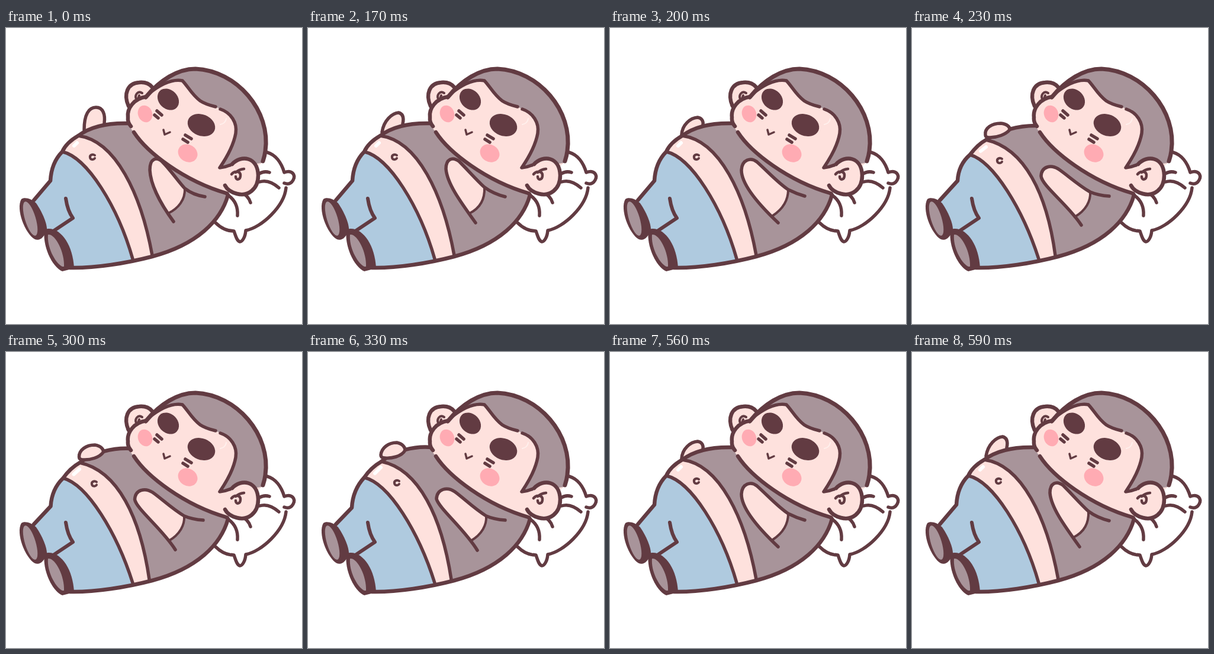
Animation of 500x500 px, one loop 0.62 s. Source, as an HTML page:

```html
<!DOCTYPE html>
<html lang="en">
<head>
<meta charset="utf-8">
<title>Belly pat</title>
<style>
  html, body { margin: 0; width: 100%; height: 100%; overflow: hidden; background: #fff; }
  svg { display: block; width: 100%; height: 100%; }
  .line { fill: none; }
  .skin { fill: #fee1dd; }
  .grey { fill: #a8949a; }
  .blue { fill: #afcadf; }
  .dark { fill: #623b42; }
  .pink { fill: #ffabb3; }
  .skin, .grey, .blue, .dark, .pink { stroke: none; }
</style>
</head>
<body>
<svg viewBox="0 0 500 500" stroke="#623b42" stroke-width="5.500" stroke-linecap="round" stroke-linejoin="round">
  <clipPath id="clip"><path id="clipShape"/></clipPath>

  <g class="line">
    <path d="M441 210C455 214 465 227 470 244C483 239 490 248 485 257C481 264 475 264 470 262"/>
    <path d="M473 270C470 301 432 337 405 342C404 354 399 361 395 361C390 360 388 351 385 343C373 343 362 337 354 329"/>
    <path d="M428 246Q436 241 445 244M428 260C440 256 452 262 461 270M396 277C405 281 411 288 413 295M376 283C387 291 392 303 391 317"/>
  </g>

  <path id="backFill" class="skin"/>
  <path id="backLine" class="line"/>

  <g clip-path="url(#clip)">
    <path class="grey" d="M0 100H400V420H0Z"/>
    <path id="belly" class="skin"/>
    <path id="pants" class="blue"/>
  </g>
  <path id="hem" class="line"/>
  <path id="waist" class="line"/>
  <path id="outline" class="line" stroke-width="6.500"/>
  <path id="shine" class="line" stroke="#fff" stroke-width="6"/>
  <path id="navel" class="line" stroke-width="4" d="M4-3C0-6-5-3-4 1C-3 5 2 5 4 2"/>
  <path class="line" stroke-width="6" d="M101 288Q104 309 113 321L80 343"/>

  <path class="dark" d="M26 289C31 285 43 288 51 296C62 312 70 332 69 342C64 353 58 360 49 357C32 348 16 305 26 289Z"/>
  <ellipse class="grey" cx="41" cy="322" rx="9" ry="30" transform="rotate(-17 41 322)"/>
  <path class="dark" d="M65 340C90 333 113 364 115 406L95 411C77 403 61 367 65 340Z"/>
  <path class="grey" d="M71 349C83 347 99 378 98 403L95 403C82 396 69 369 71 349Z"/>

  <path id="armFill" class="skin"/>
  <path id="armCuff" class="line" stroke-width="4"/>
  <path id="armLine" class="line"/>
  <path id="hand" fill="#fee1dd"/>

  <path class="skin" d="M206 131C198 112 205 93 225 92C235 91 242 94 247 100L236 120Z"/>
  <path class="line" stroke-width="6.500" d="M207 132C198 112 205 93 225 92C235 91 242 94 247 100"/>
  <path class="line" stroke-width="4" d="M220 120C217 113 223 105 230 110M225 114L223 120"/>

  <path class="skin" d="M237 116C216 119 204 136 205 151C204 160 209 168 216 176C238 210 300 258 372 279L432 228C460 140 390 72 320 69C290 69 260 88 237 116Z"/>
  <path class="grey" d="M236 117C260 88 290 69 320 69C390 72 448 140 438 208L432 228L361 237C372 220 384 200 388 178C390 160 380 143 362 137L354 133C340 131 332 127 328 123C315 114 306 97 298 89C280 86 262 94 236 117Z"/>
  <g class="line">
    <path stroke-width="7" d="M236 117C260 88 290 69 320 69C390 72 448 140 438 208Q437 216 434 225"/>
    <path d="M240 112C262 94 282 86 298 89C306 97 315 114 328 123Q337 129 354 133M362 137C380 143 391 160 388 178C384 200 372 220 361 236Q371 235 380 231"/>
    <path stroke-width="6.500" d="M237 116C216 119 204 136 206 151Q205 159 211 166M216 176C238 210 300 258 372 279"/>
    <path stroke="#fff0ed" stroke-width="2" d="M362 163Q371 161 372 153"/>
  </g>

  <path class="skin" d="M382 230C397 214 425 217 426 249C426 273 408 285 390 280Q375 276 370 266Z"/>
  <path class="line" stroke-width="6.500" d="M382 230C397 214 425 217 426 249C426 273 408 285 390 280Q375 276 370 266"/>
  <path class="line" stroke-width="4.500" d="M381 247C386 241 396 241 396 249C396 257 388 258 388 251M388 244Q393 239 402 238"/>

  <ellipse class="dark" cx="274" cy="120.500" rx="20" ry="16" transform="rotate(45 274 120.500)"/>
  <ellipse class="dark" cx="330" cy="164" rx="24" ry="18" transform="rotate(22 330 164)"/>
  <ellipse class="pink" cx="235" cy="145" rx="12" ry="14.500" transform="rotate(-20 235 145)"/>
  <ellipse class="pink" cx="307" cy="211.500" rx="17" ry="14.500" transform="rotate(30 307 211.500)"/>
  <path class="line" d="M255 140L263 147M251 147L257 152M303 181L313 187M299 188L307 193"/>
  <path class="line" stroke-width="3.500" d="M266 172L268 180L277 176"/>
</svg>
<script>
const el = id => document.getElementById(id);
const draw = (id, d) => el(id).setAttribute('d', d);

// Body states: left side, shirt top, hem and waist curves
const relaxed = {
  knee: '75 258', side: 'C76 240 82 222', hip: '95 209', fold: 'C99 200 108 190', rib: '122 182',
  top: 'C143 166 175 160 208 161', hem: 'C185 190 228 280 247 384', waist: 'C137 218 189 302 214 390',
  navel: '146 218', shine: 'M115 199L120 194'
};
const pressed = {
  knee: '77 258', side: 'C78 240 84 226', hip: '98 214', fold: 'C104 206 112 196', rib: '125 189',
  top: 'C150 173 180 164 214 165', hem: 'C190 203 228 280 242 384', waist: 'C138 226 187 306 214 390',
  navel: '148 224', shine: 'M116 208L125 201'
};
const bounced = {
  knee: '74 263', side: 'C75 245 82 226', hip: '95 212', fold: 'C101 203 110 193', rib: '124 185',
  top: 'C145 167 180 158 210 161', hem: 'C188 198 226 280 242 384', waist: 'C137 222 187 304 214 390',
  navel: '150 221', shine: 'M113 205L123 195'
};

// Near arm: forearm edge, rounded elbow to cuff corner, sleeve, cuff curve
const up = { ...relaxed,
  edge: 'M283 327', arm: 'C258 293 244 262 243 240C243 220 254 217 264 226C278 240 290 258 302 271',
  sleeve: 'Q316 282 336 285', cuff: 'C303 290 291 305 274 313',
  back: 'M132 172C132 146 140 134 152 134C164 134 168 146 166 161' };
const mid = { ...relaxed,
  edge: 'M283 329', arm: 'C255 290 235 262 233 238C233 221 244 217 255 225C270 240 284 256 298 269',
  sleeve: 'Q313 280 333 285', cuff: 'C299 289 291 304 273 313',
  back: 'M125 176C128 156 142 144 153 143C161 145 162 153 160 162' };
const low = { ...relaxed,
  edge: 'M284 329', arm: 'C250 297 222 264 222 240C223 222 238 218 248 226C266 242 284 262 301 273',
  sleeve: 'Q315 280 329 284', cuff: 'C301 290 293 305 275 317',
  back: 'M121 180C122 164 135 152 148 151C155 152 158 157 157 164' };
const pat = { ...pressed,
  edge: 'M286 333', arm: 'C265 300 219 266 218 250C219 233 235 231 247 238C262 248 280 265 301 277',
  sleeve: 'Q315 283 333 284', cuff: 'C302 292 294 308 275 319',
  hand: 'M124 181C122 169 135 161 150 161C160 162 166 167 165 172C158 180 144 185 132 185C127 185 124 184 124 181Z' };
const rest = { ...bounced,
  edge: 'M286 335', arm: 'C265 300 221 264 217 248C218 231 235 227 248 236C262 246 280 264 301 277',
  sleeve: 'Q315 283 333 284', cuff: 'C302 292 294 308 275 319',
  hand: 'M123 174C124 162 136 153 150 153C160 155 164 161 164 166C158 177 140 180 130 179C125 179 123 177 123 174Z' };

function mix(a, b, k) {
  const blend = (p, q) => {
    const to = q.match(/[\d.]+/g);
    let i = 0;
    return p.replace(/[\d.]+/g, n => +n + (to[i++] - n) * k);
  };
  return Object.fromEntries(Object.keys(a).map(key => [key, blend(a[key], b[key])]));
}

const LOOP = 620;
const steps = [[0, up], [170, mid], [200, low], [230, pat], [300, mix(pat, rest, 0.5)],
  [330, rest], [560, low], [590, mid]];

const lastPoint = d => d.match(/[\d.]+ [\d.]+$/)[0];
const below = (curve, start) => `${curve}V420H0V${start.split(' ')[1]}Z`;

function render(p) {
  const shape = `M47 291L${p.knee}${p.side} ${p.hip}${p.fold} ${p.rib}${p.top}` +
    'L300 180L375 282C363 326 322 366 247 386C205 397 150 406 108 405';
  const hem = `M${p.rib}${p.hem}`, waist = `M${p.hip}${p.waist}`;

  draw('clipShape', shape + 'L70 344L62 330Z');
  draw('outline', shape);
  draw('hem', hem);
  draw('waist', waist);
  draw('belly', below(hem, p.rib));
  draw('pants', below(waist, p.hip));
  draw('shine', p.shine);
  el('navel').setAttribute('transform', `translate(${p.navel})`);
  draw('backFill', p.back ? p.back + 'L150 190Z' : '');
  draw('backLine', p.back || '');
  draw('hand', p.hand || '');
  draw('armFill', `M${lastPoint(p.cuff)}${p.arm}${p.cuff}Z`);
  draw('armCuff', `M${lastPoint(p.arm)}${p.cuff}`);
  draw('armLine', p.edge + p.arm + p.sleeve);
}

const begin = performance.now();
let shown;
function tick() {
  const t = (performance.now() - begin) % LOOP;
  const pose = steps.filter(s => s[0] <= t).pop()[1];
  if (pose !== shown) render(shown = pose);
  requestAnimationFrame(tick);
}
tick();
</script>
</body>
</html>
```
